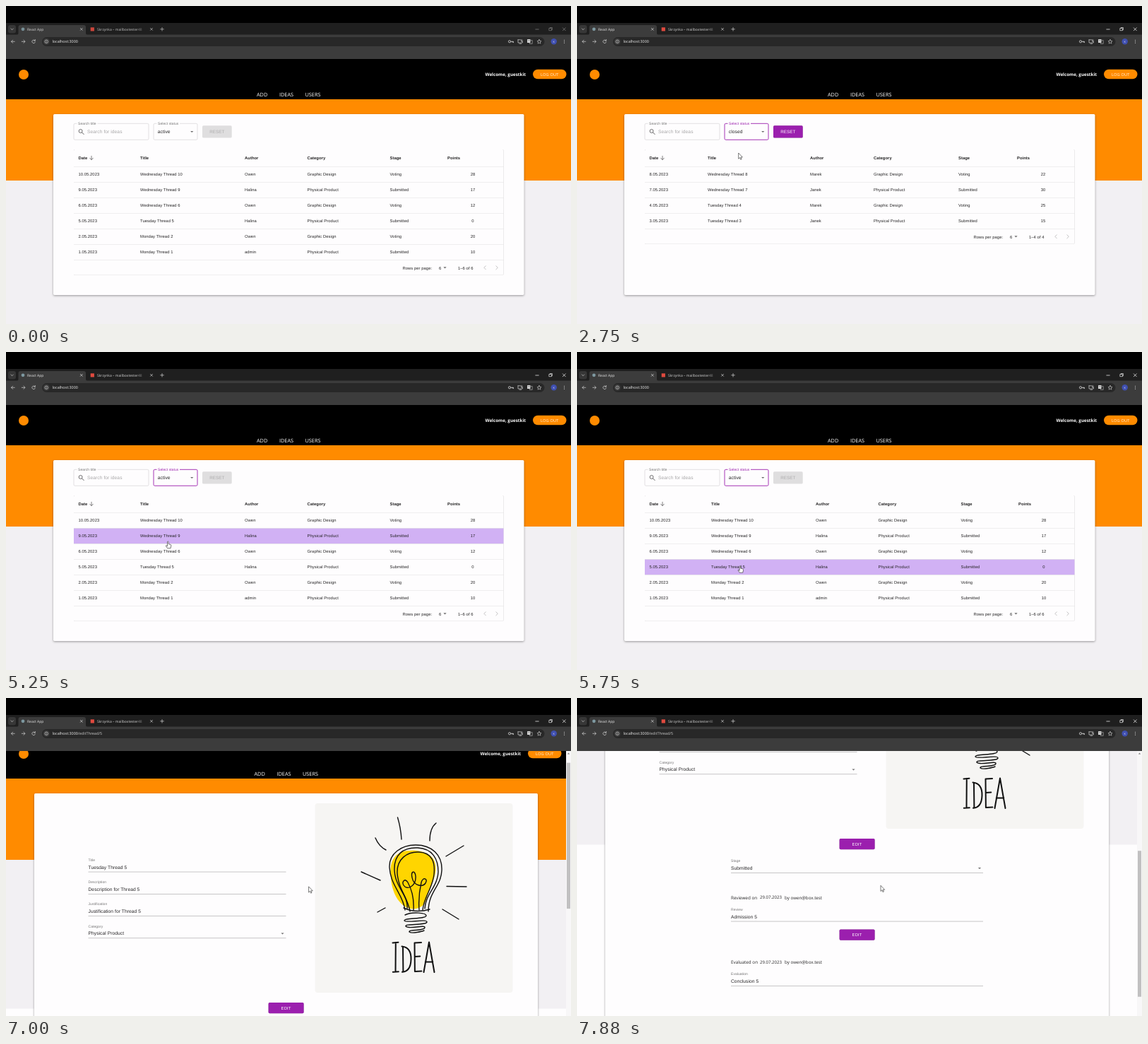
An HTML page that plays this animation: 800x450 px, repeating every 8 s.

```html
<!DOCTYPE html>
<html lang="en">
<head>
<meta charset="utf-8">
<title>Ideas board</title>
<style>
  html, body { margin: 0; width: 100%; height: 100%; overflow: hidden; background: #000; }
  svg { display: block; }
  text { font-family: "Liberation Sans", Arial, sans-serif; letter-spacing: .01em; text-rendering: geometricPrecision; white-space: pre; }
  .ui { font-family: "Open Sans", "Noto Sans", sans-serif; letter-spacing: 0; }
  .bold { font-weight: 700; }
  .line { fill: none; stroke-linecap: round; stroke-linejoin: round; }
  .card { fill: #fefdfe; filter: drop-shadow(0 1px 1.4px rgba(0, 0, 0, .38)); }
  .paper { fill: #fefdfe; filter: drop-shadow(0 .6px .6px rgba(0, 0, 0, .3)); }
  .menu { fill: #fefdfe; filter: drop-shadow(0 2px 2.2px rgba(0, 0, 0, .42)); }
  .button { fill: #9b1fae; filter: drop-shadow(0 .7px .6px rgba(0, 0, 0, .35)); }
</style>
</head>
<body>
<svg id="stage" width="800" height="450" viewBox="0 0 800 450"></svg>
<script>
const INK = '#262526', GREY = '#757475', PURPLE = '#9b1fae', ORANGE = '#ff8b00';
const LOOP = 8000, STEP = 125;

// y is the middle of the capitals
const text = (x, y, s, size = 5.83, fill = INK, extra = '') =>
  `<text x="${x}" y="${y + size * .355}" font-size="${size}" fill="${fill}" ${extra}>${s}</text>`;
const ui = (x, y, s, size, fill, extra = '') => text(x, y, s, size, fill, `class="ui" ${extra}`);
const rect = (x, y, w, h, fill, extra = '') =>
  `<rect x="${x}" y="${y}" width="${w}" height="${h}" ${fill ? `fill="${fill}"` : ''} ${extra}/>`;
const path = (d, stroke, width = .8, extra = '') =>
  `<path class="line" d="${d}" stroke="${stroke}" stroke-width="${width}" ${extra}/>`;
const circle = (x, y, r, fill, extra = '') => `<circle cx="${x}" cy="${y}" r="${r}" fill="${fill}" ${extra}/>`;
const arrow = (x, y, up = false, extra = '') =>
  `<path d="M${x - 2.1} ${y + (up ? 1 : -1)}h4.2l-2.1 ${up ? -2.1 : 2.1}z" fill="#6b6a6b" ${extra}/>`;
const cross = (x, y, r, c, w) => path(`M${x - r} ${y - r}l${2 * r} ${2 * r}m0 ${-2 * r}l${-2 * r} ${2 * r}`, c, w);
const middle = 'text-anchor="middle"';

function header(navShift, rightShift) {
  const nav = [[355, 'ADD'], [387, 'IDEAS'], [423.5, 'USERS']];
  return rect(0, 75, 800, 57, '#000') + rect(0, 132, 800, 115, ORANGE) +
    circle(25, 97, 7, ORANGE) +
    nav.map(([x, s]) => ui(x + navShift, 125.3, s, 7.3, '#fff')).join('') +
    text(678.5 + rightShift, 97, 'Welcome, guestkit', 6.25, '#fff', 'class="ui bold"') +
    rect(746 + rightShift, 89.8, 47.5, 13.5, ORANGE, 'rx="6.75"') +
    ui(769.8 + rightShift, 96.6, 'LOG OUT', 5.6, '#fff3e0', `${middle} style="letter-spacing:.2px"`);
}

function table(id, cols, rows) {
  const heads = ['Date', 'Title', 'Author', 'Category', 'Stage', 'Points'];
  const end = 227.3 + rows.length * 22, foot = end + 11;
  let out = rect(96, 203, 608.5, end + 22 - 203 - .5, '', 'class="paper" rx="1.5"');
  if (id === 'active') out += rect(96, 0, 608.5, 21.8, '#d1b1f4', 'id="rowHover"');
  out += heads.map((h, i) => text(cols[i], 215.2, h, 5.83, INK, 'class="bold"')).join('');
  out += path('M121 212.3v5.2m-2.3-2.3l2.3 2.4l2.3-2.4', '#4b4a4b', .7);
  rows.forEach(([date, title, author, points], i) => {
    const y = 238.2 + i * 22, odd = i % 2;
    const cells = [date + '.05.2023', title, author,
      odd ? 'Physical Product' : 'Graphic Design', odd ? 'Submitted' : 'Voting'];
    out += cells.map((c, k) => text(cols[k], y, c)).join('') + text(cols[6], y, points, 5.83, INK, middle);
  });
  for (let i = 0; i <= rows.length; i++) out += rect(96, 227.1 + i * 22, 608.5, .45, '#dcdbdc');
  const n = rows.length;
  out += text(561.5, foot + .2, 'Rows per page:') + text(613, foot + .2, '6') + arrow(621.5, foot) +
    text(640, foot + .2, `1–${n} of ${n}`) +
    path(`M679.3 ${foot - 2.5}l-2.5 2.5l2.5 2.5M693.8 ${foot - 2.5}l2.5 2.5l-2.5 2.5`, '#b5b4b5', .8);
  return `<g id="${id}">${out}</g>`;
}

function listPage() {
  const outline = (x, w, label, lw, id = '') =>
    rect(x, 166.3, w, 23, 'none', `rx="1.7" stroke="#c4c3c4" stroke-width=".5" ${id && `id="${id}Box"`}`) +
    rect(x + 4.5, 165, lw + 3.5, 2.5, '#fefdfe') +
    text(x + 6, 166.3, label, 5, GREY, id && `id="${id}Label"`);
  return `<g id="list">` + rect(0, 75, 800, 375, '#f2f0f3') + header(0, 0) +
    rect(67, 153, 666.5, 256, '', 'class="card" rx="1.7"') +
    outline(96, 106, 'Search title', 25.5) +
    circle(105.6, 177, 2.5, 'none', 'stroke="#5f5e5f" stroke-width=".9"') + path('M107.6 179l2.6 2.6', '#5f5e5f', 1) +
    text(115, 178, 'Search for ideas', 6.67, '#a8a7a8') +
    outline(209, 62, 'Select status', 29, 'select') +
    text(214.8, 178, '', 6.67, INK, 'id="value"') +
    arrow(263.2, 178, false, 'id="down"') + arrow(263.2, 178, true, 'id="up"') +
    `<g id="resetOff">` + rect(278, 169.3, 41.7, 17.3, '#dfdedf', 'rx="1.7"') + text(298.8, 178, 'RESET', 6.25, '#adacad', middle) + '</g>' +
    `<g id="resetOn">` + rect(278, 169.3, 41.7, 17.3, '', 'class="button" rx="1.7"') + text(298.8, 178, 'RESET', 6.25, '#fff', middle) + '</g>' +
    table('active', [102.5, 190, 338, 426.5, 543.5, 625, 661], [
      ['10', 'Wednesday Thread 10', 'Owen', 28], ['9', 'Wednesday Thread 9', 'Halina', 17],
      ['6', 'Wednesday Thread 6', 'Owen', 12], ['5', 'Tuesday Thread 5', 'Halina', 0],
      ['2', 'Monday Thread 2', 'Owen', 20], ['1', 'Monday Thread 1', 'admin', 10]]) +
    table('closed', [102.5, 185, 330, 420, 540, 623, 660], [
      ['8', 'Wednesday Thread 8', 'Marek', 22], ['7', 'Wednesday Thread 7', 'Janek', 30],
      ['4', 'Tuesday Thread 4', 'Marek', 25], ['3', 'Tuesday Thread 3', 'Janek', 15]]) +
    `<g id="menu">` + rect(208.7, 190.3, 62.5, 36.4, '', 'class="menu" rx="1.7"') +
    rect(208.7, 0, 62.5, 15, '#f6f5f6', 'id="itemHover"') + rect(208.7, 0, 62.5, 15, '#eeedee', 'id="itemPicked"') +
    text(215.2, 200.3, 'active', 6.67) + text(215.2, 215.3, 'closed', 6.67) + '</g></g>';
}

function bulb() {
  const ink = (d, w = 1.4) => path(d, '#111', w);
  return rect(437.5, 167, 280, 268, '#f6f5f3', 'rx="4"') +
    '<path fill="#ffd500" d="M560 236C575 231 602 234 607 250C613 266 600 285 596 300C593 314 582 318 572 316C556 312 546 292 545 272C543 255 546 242 560 236Z"/>' +
    ink('M565 318C562 295 545 285 543 258C542 238 560 226 580 226C603 226 618 240 617 262C616 285 598 292 598 320') +
    ink('M568 316C570 297 551 286 550 262C549 240 562 229 583 230C604 231 612 246 612 264C611 286 594 295 593 316') +
    ink('M572 320C569 300 556 290 554 266C553 246 568 235 585 236C603 237 608 250 606 268C603 290 592 298 590 318') +
    ink('M563 315Q580 323 600 317') +
    ink('M577 318C578 300 574 288 569 279C565 272 560 278 563 283C568 291 581 284 580 270C579 261 573 263 575 272C577 284 590 286 594 280C598 273 590 271 588 279C585 292 584 305 585 318') +
    ink('M565 325C575 320 595 322 595 326C595 331 563 329 564 333C566 337 596 330 596 335C595 340 564 337 566 341C570 346 594 338 593 343C592 348 570 345 571 349C575 352 590 348 592 347') +
    ink('M554.5 187Q559 202 560 218M609 195Q600 202 600 220M648 227L623 242M624 284.5L652 285M618 317L641 331M537 315L526 321M503 264L530 276M523 216Q528 228 538 233') +
    ink('M547.5 364.5l8-.8M551.8 364l-.3 41.5M547.8 405.8l8-.5M562 370l.4 35.5M560.5 369.5Q574 371 573.5 388Q573 405 561 405.8M588 364l-9.5.6l.4 40.5l9.5-.6M578.8 384l7.5-.4M591.5 406L599 363.5L606.5 406M593.8 391.5l10.5-.3', 2);
}

function field(x, y, w, label, value, drop) {
  return text(x, y, label, 5, GREY) + text(x, y + 10.3, value, 6.67) + rect(x, y + 16.8, w, .5, '#8f8e8f') +
    (drop ? arrow(x + w - 5, y + 10.6) : '');
}
const editButton = y => rect(371.6, y, 50, 15.2, '', 'class="button" rx="1.7"') +
  text(396.6, y + 7.6, 'EDIT', 5.83, '#fff', middle + ' style="letter-spacing:.17px"');
const signed = (y, verb) => ui(218, y, verb + ' on', 6.3, INK) + ui(259, y, '29.07.2023', 6.05, INK) +
  ui(294, y, 'by', 6.3, INK) + ui(302.6, y, 'owen@box.test', 6.2, INK);

function editPage() {
  return `<g id="edit">` + rect(0, 75, 800, 375, '#fefdfe') + `<g id="scroller">` +
    rect(0, 75, 800, 382.5, '#f2f0f3') + header(-3.5, -7) +
    rect(40, 153, 713, 562, '', 'class="card" rx="1.7"') + bulb() +
    field(116.5, 247, 280, 'Title', 'Tuesday Thread 5') +
    field(116.5, 278.2, 280, 'Description', 'Description for Thread 5') +
    field(116.5, 309.5, 280, 'Justification', 'Justification for Thread 5') +
    field(116.5, 340.8, 280, 'Category', 'Physical Product', true) +
    rect(116.5, 294.5, 280, .9, '#222', 'id="fieldHover"') +
    editButton(449) + field(218, 480.3, 357, 'Stage', 'Submitted', true) +
    signed(532.3, 'Reviewed') + field(218, 549, 357, 'Review', 'Admission 5') + editButton(577.5) +
    signed(624, 'Evaluated') + field(218, 640.6, 357, 'Evaluation', 'Conclusion 5') + '</g>' +
    rect(793, 75, 7, 375, '#f8f7f8') + '<path d="M794.8 79.6h3.4l-1.7-2.2z" fill="#7a797a"/>' +
    rect(794, 82, 5, 206.5, '#c1c0c1', 'id="thumb"') + '</g>';
}

function browser() {
  const c = '#d6d6d6';
  return rect(0, 0, 800, 24, '#000') + rect(0, 24, 800, 17, '#1f1f1f') + rect(0, 40.5, 800, 34.5, '#3c3c3c') +
    rect(3, 27, 11, 11.5, '#373737', 'rx="3"') + path('M6.9 32l1.7 1.7l1.7-1.7', c, .7) +
    '<path d="M15 41Q17.5 41 17.5 38V30Q17.5 27 20.5 27H110Q113 27 113 30V38Q113 41 115.5 41z" fill="#3c3c3c"/>' +
    '<g id="tabs">' + circle(24, 32.8, 2.4, '#7d98a0') + ui(30, 32.8, 'React App', 5, '#e6e6e6') + cross(106.8, 32.8, 1.5, c, .7) +
    rect(119.7, 30.3, 5.2, 5.2, '#e04a3f') + ui(129, 32.8, 'Skrzynka – mailboxtester48', 5, c) +
    rect(184, 28, 15, 10, 'url(#fade)') + rect(199, 28, 4, 10, '#1f1f1f') + cross(206, 32.8, 1.5, c, .7) +
    path('M218.7 32.8h4.6m-2.3-2.3v4.6', c, .7) + '</g>' +
    '<g id="controls">' + path('M749.8 33h4.4', '#fff', .7) + path('M769.2 31.5h3.2v3.2h-3.2zM770.2 31.4v-.9h3.2v3.2h-.9', '#fff', .6) +
    cross(790.3, 32.8, 2, '#fff', .7) + '</g>' +
    path('M12.2 50.3h-4.6m2-2.1l-2.1 2.1l2.1 2.1M22.3 50.3h4.6m-2-2.1l2.1 2.1l-2.1 2.1', c, .7) +
    path('M41 48.9A2.3 2.3 0 1 0 41.4 51M41.3 47.4v1.8h-1.8', c, .7) +
    rect(51, 44, 711.5, 13, '#282828', 'rx="6.5"') + circle(57.2, 50.3, 4.6, '#3c3c3c') +
    circle(57.2, 50.3, 2.3, 'none', `stroke="${c}" stroke-width=".6"`) + path('M57.2 50.1v1.2M57.2 49v.1', c, .6) +
    ui(65.5, 50.3, 'localhost:3000<tspan id="route" fill="#c9c9c9">/editThread/5</tspan>', 5.4, '#f0f0f0') +
    circle(713, 50.3, 1.6, 'none', `stroke="${c}" stroke-width=".8"`) + path('M714.7 50.3h3.8v1.4m-1.4-1.4v1', c, .8) +
    path('M725 47.8h4M725 47.8v4.2h6.3v-1.6M727 53.3h2.6M730.3 47.5v2.6m-1.2-1.1l1.2 1.2l1.2-1.2', c, .7) +
    rect(738, 47, 4.5, 5, c, 'rx=".5"') + path('M743 48.6h2.2v4.8h-3.8v-1.2M739.2 49h2M740.2 50.8l1-1.8', c, .5) + path('M739.2 49h2', '#282828', .5) +
    path('M755 47.4l.9 2l2.1.2l-1.6 1.4l.5 2.1l-1.9-1.1l-1.9 1.1l.5-2.1l-1.6-1.4l2.1-.2z', c, .6) +
    circle(775.7, 50.3, 4.2, '#3f4fb0') + ui(775.7, 50.3, 'K', 3.8, '#e4e6f5', middle) +
    [48.3, 50.3, 52.3].map(y => circle(790.5, y, .55, c)).join('');
}

const pointers = `<g id="pointer">
  <path id="arrowShape" d="M0 0v8.2l1.9-1.7l1.2 2.8l1.3-.6l-1.2-2.7h2.5z" fill="#fff" stroke="#222" stroke-width=".6"/>
  <path id="handShape" d="M-.8 0Q0-1 .8 0v3.2l3 .8q.9.4.7 1.5l-.7 3.7h-4.6l-2-3q-.4-1.2.8-.8l1.2 1z" fill="#fff" stroke="#222" stroke-width=".6"/>
  <path id="beamShape" class="line" d="M-1.5-3.8h3M0-3.8v7.6M-1.5 3.8h3" stroke="#222" stroke-width=".7"/></g>`;

document.getElementById('stage').innerHTML =
  '<defs><linearGradient id="fade"><stop offset="0" stop-color="#1f1f1f" stop-opacity="0"/><stop offset="1" stop-color="#1f1f1f"/></linearGradient></defs>' +
  listPage() + editPage() + browser() + pointers;

const el = {};
document.querySelectorAll('[id]').forEach(e => { el[e.id] = e; });
const show = (id, on) => el[id].setAttribute('visibility', on ? 'inherit' : 'hidden');
const set = (id, name, v) => el[id].setAttribute(name, v);

// time, then values
const POINTER = [[125, 74, 341], [375, 80, 297], [625, 80, 297], [875, 100, 225], [1125, 180, 200], [1375, 241, 184],
  [1625, 241, 184], [1875, 238, 200], [2250, 228, 214], [2625, 228, 214], [3000, 230, 196], [3375, 231.7, 178.5],
  [3875, 231.7, 178.5], [4375, 230, 199], [4625, 230, 200], [4875, 229, 225], [5250, 229.3, 268.5], [5500, 231, 301],
  [5875, 231, 304], [6125, 250, 292], [6375, 267, 285], [6625, 330, 282], [6875, 428.5, 266.8], [7375, 428.8, 267], [7875, 430, 265.3]];
const SCROLL = [[6875, 0], [7000, 18], [7125, 56], [7250, 104], [7375, 148], [7500, 182], [7625, 214], [7750, 239], [7875, 250]];

function sample(keys, t) {
  const i = keys.findIndex(k => k[0] > t);
  if (i === 0) return keys[0].slice(1);
  if (i < 0) return keys[keys.length - 1].slice(1);
  const [a, b] = [keys[i - 1], keys[i]], p = (t - a[0]) / (b[0] - a[0]);
  return a.slice(1).map((v, k) => v + (b[k + 1] - v) * p);
}
const within = (v, lo, hi) => v >= lo && v < hi;

function menuAlpha(t) {
  for (const [open, close] of [[1500, 2625], [3500, 4750]]) {
    if (within(t, open, close)) return t < open + STEP ? .6 : 1;
    if (within(t, close, close + STEP)) return .4;
  }
  return 0;
}

function draw(now) {
  const t = Math.floor(now % LOOP / STEP) * STEP;
  const [x, y] = sample(POINTER, t), [scroll] = sample(SCROLL, t);
  const editing = t >= 5875, closed = within(t, 2625, 4750), focused = t >= 1500;
  const alpha = menuAlpha(t), open = alpha > .5;

  show('list', !editing);
  show('edit', editing);
  set('route', 'display', editing ? 'inline' : 'none');
  set('controls', 'opacity', focused ? 1 : .45);
  set('tabs', 'opacity', focused ? 1 : .9);

  show('active', !closed);
  show('closed', closed);
  show('resetOn', closed);
  show('resetOff', !closed);
  el.value.textContent = closed ? 'closed' : 'active';
  set('selectBox', 'stroke', focused ? PURPLE : '#c4c3c4');
  set('selectBox', 'stroke-width', focused ? .9 : .5);
  set('selectLabel', 'fill', focused ? PURPLE : GREY);
  show('up', open);
  show('down', !open);

  set('menu', 'opacity', alpha);
  const item = Math.floor((y - 192.7) / 15);
  show('itemHover', open && (item === 0 || item === 1));
  set('itemHover', 'y', 192.7 + item * 15);
  set('itemPicked', 'y', closed ? 207.7 : 192.7);

  const row = Math.floor((y - 227.3) / 22);
  const onRow = t >= STEP && !editing && !alpha && within(x, 96, 704) && within(row, 0, 6);
  show('rowHover', onRow && !closed);
  set('rowHover', 'y', 227.4 + row * 22);

  const onField = editing && !scroll && within(x, 116, 397) && within(y, 279, 296);
  show('fieldHover', onField);
  set('scroller', 'transform', `translate(0 ${-scroll})`);
  set('thumb', 'y', 82 + scroll * .537);

  const onSelect = !editing && !alpha && within(x, 209, 271) && within(y, 166, 190);
  const hand = onRow || onSelect || (open && within(y, 192.7, 222.7) && x < 271);
  show('pointer', t >= STEP);
  show('handShape', t >= STEP && hand);
  show('beamShape', onField);
  show('arrowShape', t >= STEP && !hand && !onField);
  set('pointer', 'transform', `translate(${x} ${y})`);
}

const start = performance.now();
function tick() {
  draw(performance.now() - start);
  requestAnimationFrame(tick);
}
tick();
</script>
</body>
</html>
```
